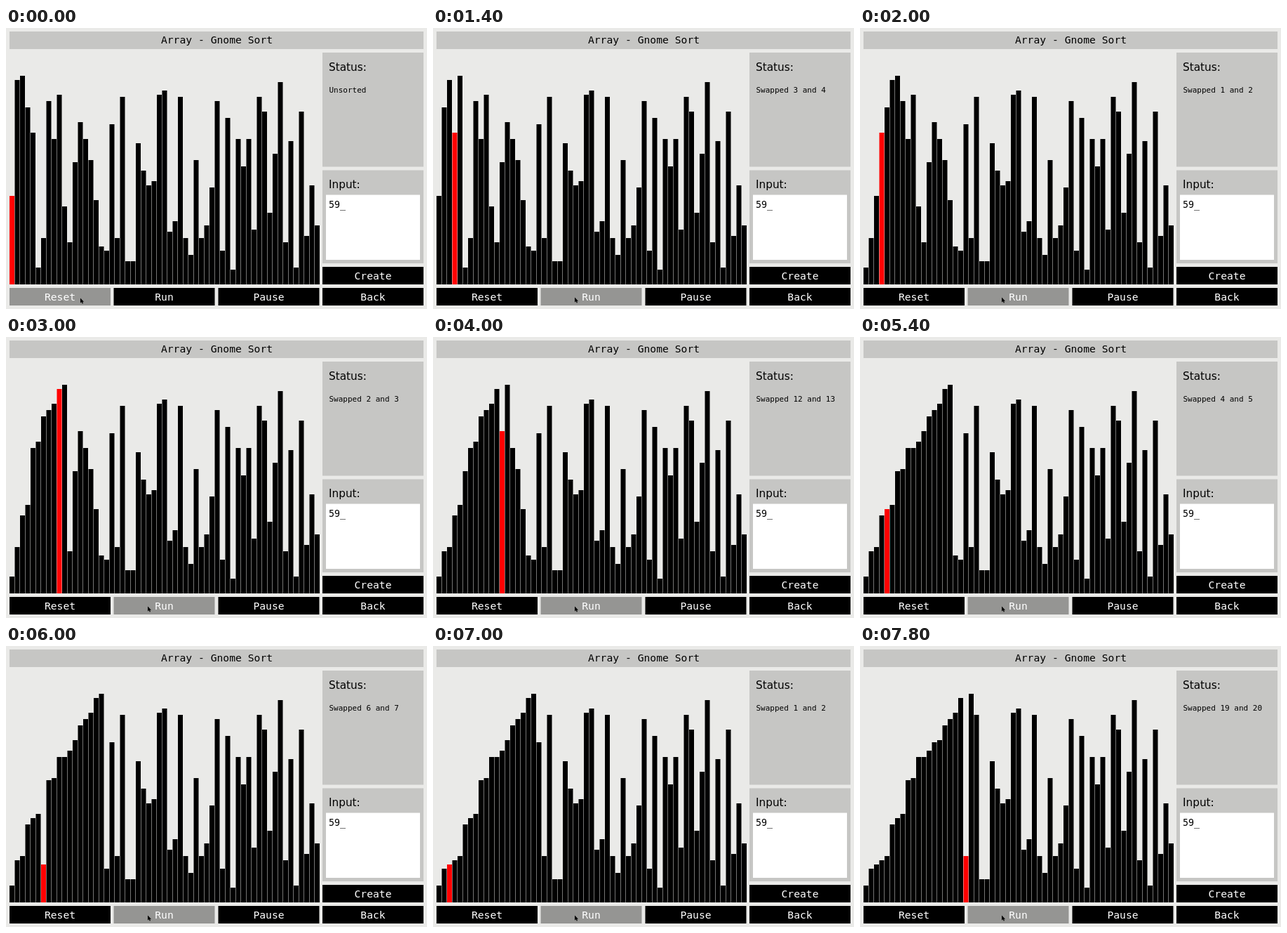
These frames come from a looping animation (600x400 px, 8000 ms). An HTML page:

```html
<!DOCTYPE html>
<html lang="en">
<head>
<meta charset="utf-8">
<title>Gnome Sort</title>
<style>
  html, body { margin: 0; width: 100%; height: 100%; overflow: hidden; background: #eaeae8; }
  svg { display: block; }
  text { font: 14.7px "DejaVu Sans Mono", monospace; white-space: pre; }
  .panel { fill: #c6c6c4; }
  .label { font: 15.3px "DejaVu Sans", sans-serif; }
  .small { font-size: 11px; }
  .entry { font-size: 13.3px; }
  .middle { text-anchor: middle; }
  .button text { fill: #fff; }
  .button.hover rect { fill: #959593; }
</style>
</head>
<body>
<svg id="stage" width="600" height="400" viewBox="0 0 600 400">
  <rect width="600" height="400" fill="#eaeae8"/>
  <rect class="panel" x="5" y="5" width="590" height="25"/>
  <text class="middle" x="300.5" y="22">Array - Gnome Sort</text>
  <rect class="panel" x="451" y="35" width="144" height="162.5"/>
  <text class="label" x="460" y="61">Status:</text>
  <text class="small" id="status" x="460.5" y="92"></text>
  <rect class="panel" x="451" y="202.5" width="144" height="132.5"/>
  <text class="label" x="460" y="228">Input:</text>
  <rect x="456" y="237.5" width="134" height="92.5" fill="#fff"/>
  <text class="entry" x="460" y="256">59_</text>
  <g id="bars"></g>
  <g id="buttons"></g>
  <path id="cursor" d="M0 0V7L1.7 5.6L2.8 8L4 7.5L3 5.2H5Z"/>
</svg>
<script>
const LOOP = 8000, TICK = 200;
const UNIT = 3, PITCH = 7.5, FLOOR = 365;
const values = [
  42, 97, 99, 84, 72, 8, 22, 87, 69, 90, 37, 20, 58, 77, 69, 59, 40, 18, 16, 76,
  22, 89, 11, 11, 67, 54, 47, 49, 90, 92, 25, 30, 89, 22, 14, 59, 22, 28, 46, 87,
  16, 79, 7, 69, 56, 69, 26, 89, 82, 34, 62, 96, 20, 68, 8, 82, 23, 47, 28
];
const byId = id => document.getElementById(id);

function add(parent, tag, attributes, content = "") {
  const node = document.createElementNS("http://www.w3.org/2000/svg", tag);
  for (const name in attributes) node.setAttribute(name, attributes[name]);
  node.textContent = content;
  return parent.appendChild(node);
}

function addButton(label, x, y) {
  const group = add(byId("buttons"), "g", { class: "button" });
  add(group, "rect", { x, y, width: 144, height: 25 });
  add(group, "text", { x: x + 72, y: y + 18, class: "middle" }, label);
  return group;
}

const reset = addButton("Reset", 5, 370);
const run = addButton("Run", 153.5, 370);
addButton("Pause", 302.5, 370);
addButton("Back", 451, 370);
addButton("Create", 451, 340);

const bars = values.map((_, i) => add(byId("bars"), "rect", { x: 5 + i * PITCH, width: 7 }));

function gnomeSort(steps) {
  const list = values.slice();
  let pos = 0, status = "Unsorted";
  while (steps-- > 0) {
    if (pos === 0 || list[pos] >= list[pos - 1]) {
      pos++;
    } else {
      [list[pos - 1], list[pos]] = [list[pos], list[pos - 1]];
      pos--;
      status = `Swapped ${pos} and ${pos + 1}`;
    }
  }
  return { list, pos, status };
}

function draw(tick) {
  // Sorting starts on tick 7, at just under eight steps per tick.
  const steps = tick < 7 ? 0 : Math.floor(33.52 + (tick - 10) * 7.94);
  const { list, pos, status } = gnomeSort(steps);
  bars.forEach((bar, i) => {
    const height = list[i] * UNIT;
    bar.setAttribute("y", FLOOR - height);
    bar.setAttribute("height", height);
    bar.setAttribute("fill", i === pos ? "#f00" : "#000");
  });
  byId("status").textContent = status;

  const p = Math.min(tick / 5, 1), eased = p * p * (3 - 2 * p);
  const x = 106 + 96 * eased, y = 384.5 - eased;
  byId("cursor").setAttribute("transform", `translate(${x} ${y})`);
  reset.classList.toggle("hover", x < 149);
  run.classList.toggle("hover", x >= 153.5);
}

let shown = -1;
function frame() {
  const tick = Math.floor(performance.now() % LOOP / TICK);
  if (tick !== shown) draw(shown = tick);
  requestAnimationFrame(frame);
}
frame();
</script>
</body>
</html>
```
